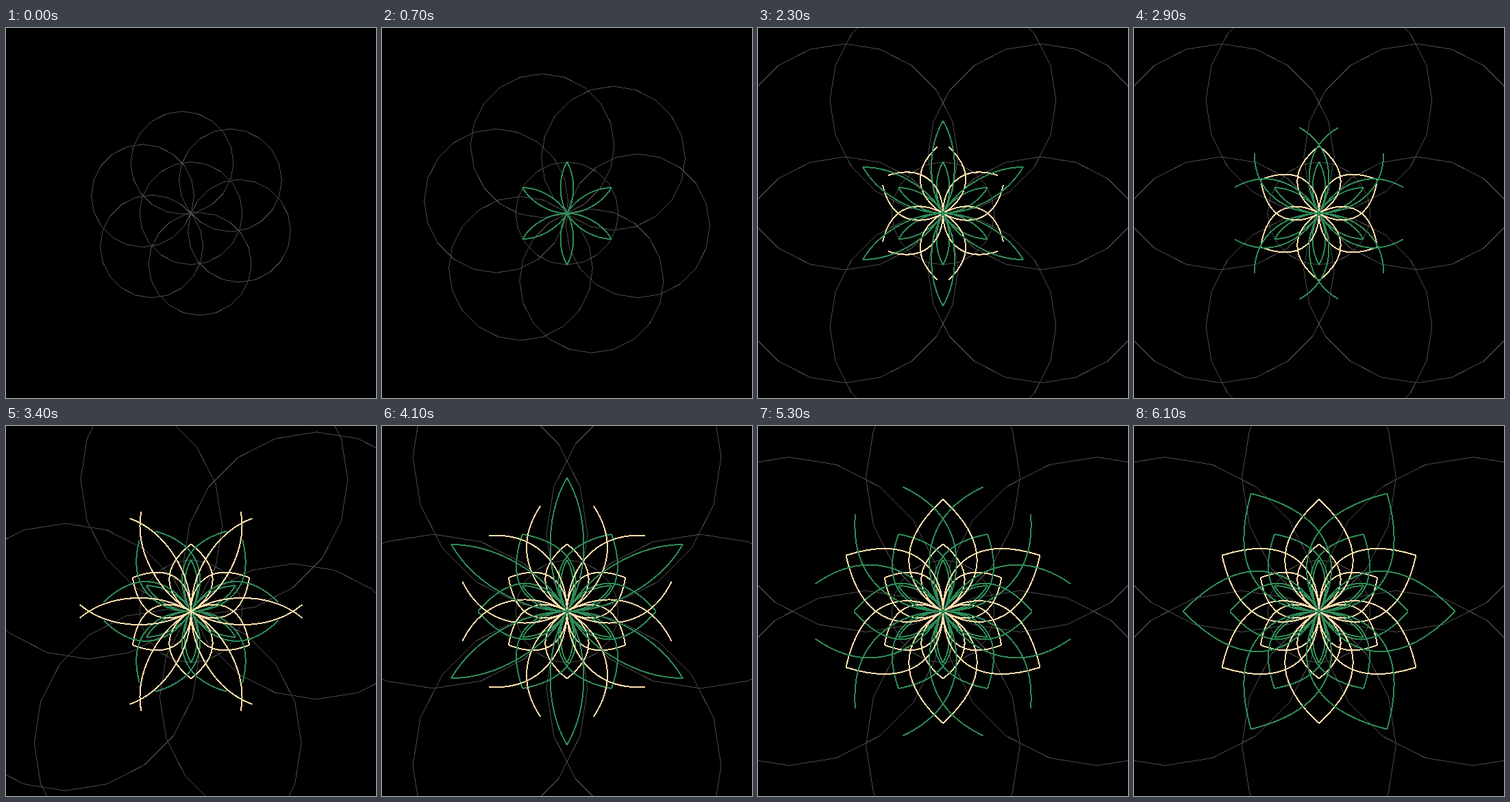
An HTML page for the animation above (6.5 s loop, 540 by 540 pixels).

```html
<!DOCTYPE html>
<html>
<head>
<meta charset="utf-8">
<style>
  html, body { margin: 0; width: 100%; height: 100%; overflow: hidden; background: #000; }
  svg { display: block; fill: none; shape-rendering: crispEdges; }
</style>
</head>
<body>
<svg width="540" height="540"><g id="stage" transform="translate(270 270.5)"></g></svg>
<script>
const stage = document.getElementById('stage');
const RAD = Math.PI / 180;
const LOOP = 6500, STEP = 100, LAST = 61;
const RADIUS = 75, GROWTH = 30, STAGE = 9, LEAD = 4, LAYERS = 5;
const SPEED = 5;

// Point at a distance and angle from the centre, plus an offset
const polar = (r, deg, x = 0, y = 0) =>
  [x + r * Math.cos(deg * RAD), y + r * Math.sin(deg * RAD)];

function addPath(color, width) {
  const path = document.createElementNS('http://www.w3.org/2000/svg', 'path');
  path.setAttribute('stroke', color);
  path.setAttribute('stroke-width', width);
  return stage.appendChild(path);
}

const sixfold = (turn, shape) =>
  Array.from({ length: 6 }, (_, i) => shape(turn + 60 * i)).join('');

// Circle as a 20-sided polygon
function ring(r, x = 0, y = 0) {
  const points = Array.from({ length: 20 }, (_, i) => polar(r, i * 18, x, y));
  return `M${points.join('L')}Z`;
}

function guides(frame) {
  const grown = Math.min(LAYERS, Math.floor((frame + LEAD) / STAGE));
  const r = RADIUS + GROWTH * grown;
  const turn = frame < 49 ? 20 - 10 * frame : 0;
  return ring(RADIUS) + sixfold(turn, a => ring(r, ...polar(r, a)));
}

// Arcs start as narrow lenses; their free ends then travel to the petal axis
function petals(layer, age) {
  if (age < 0) return '';
  const r = RADIUS + GROWTH * layer;
  const [x, y] = polar(r, 30);
  const slant = 5 + 3 * layer;
  const path = y / Math.cos(slant * RAD);
  const done = age >= Math.round(path / SPEED);
  const travel = layer === 0 ? 0 : done ? path : age * SPEED;
  const handle = r / 3;
  const knots = [polar(handle, 60), [x - handle, y], polar(travel, slant - 90, x, y)];

  const arc = (axis, side) => 'M0,0C' + knots.map(([px, py]) =>
    polar(Math.hypot(px, py), axis + side * Math.atan2(py, px) / RAD)).join(' ');
  return sixfold(layer % 2 * 30, axis => arc(axis, 1) + arc(axis, -1));
}

const guidePath = addPath('#484848', 1);
const petalPaths = Array.from({ length: LAYERS }, (_, layer) =>
  addPath(layer % 2 ? 'navajowhite' : 'seagreen', 2));

function draw(time) {
  const frame = Math.min(LAST, Math.floor(time % LOOP / STEP));
  guidePath.setAttribute('d', guides(frame));
  petalPaths.forEach((path, layer) =>
    path.setAttribute('d', petals(layer, frame + LEAD - STAGE * (layer + 1))));
}

const start = performance.now();
function tick() {
  draw(performance.now() - start);
  requestAnimationFrame(tick);
}
tick();
</script>
</body>
</html>
```
